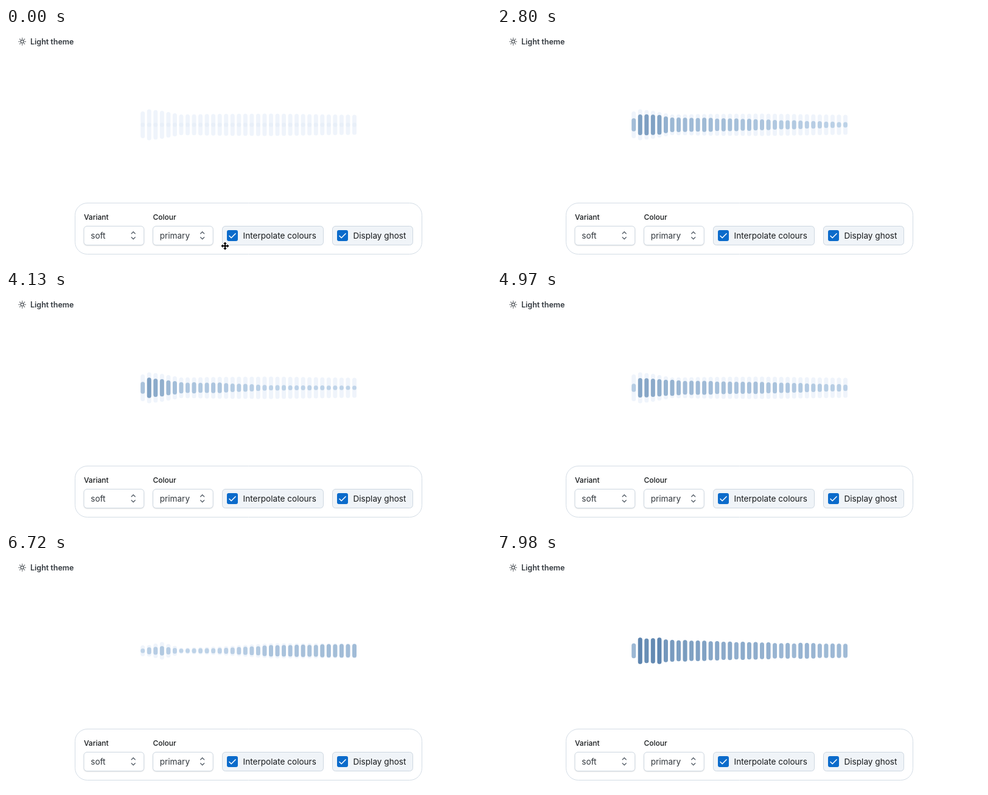
An HTML page with a canvas for the animation above (8000 ms loop, 797x386 px).

```html
<!DOCTYPE html>
<html lang="en">
<head>
<meta charset="utf-8">
<title>Waveform</title>
<style>
  html, body { margin: 0; width: 100%; height: 100%; overflow: hidden; background: #fff; }
  canvas { display: block; width: 797px; height: 386px; }
</style>
</head>
<body>
<canvas id="stage"></canvas>
<script>
const W = 797, H = 386, LOOP = 8000, STEP = 70;
const BARS = 34, LEFT = 224.7, PITCH = 10.54, MID = 159, BAR_W = 7;
const canvas = document.getElementById('stage');
const dpr = window.devicePixelRatio || 1;
canvas.width = W * dpr;
canvas.height = H * dpr;
const ctx = canvas.getContext('2d');

const lerp = (a, b, u) => a + (b - a) * u;
const clamp = x => Math.min(1, Math.max(0, x));
const rgb = c => `rgb(${c.map(Math.round)})`;
const mix = (a, b, u) => rgb(a.map((v, i) => lerp(v, b[i], u)));

// Repeatable noise from -1 to 1.
function noise(i, seed) {
  const x = Math.sin(i * 12.9898 + seed * 78.233) * 43758.5453;
  return (x - Math.floor(x)) * 2 - 1;
}

// A spectrum is a smooth outline through a few bands, closer together at the low end.
const BANDS = [0, 1, 3, 6, 12, 20, 33];
function outline(...heights) {
  return i => {
    let k = 0;
    while (k < BANDS.length - 2 && i > BANDS[k + 1]) k++;
    return lerp(heights[k], heights[k + 1], (i - BANDS[k]) / (BANDS[k + 1] - BANDS[k]));
  };
}

const poses = [
  { time: 0, shape: () => 0 },
  { time: 1540, shape: outline(18, 32, 30, 20, 22, 18, 10) },
  { time: 2800, shape: outline(23, 36, 34, 24, 22, 18, 9) },
  { time: 4130, shape: outline(20, 34, 27, 18, 17, 9, 7) },
  { time: 4970, shape: outline(14, 31, 32, 25, 22, 19, 11) },
  { time: 6720, shape: outline(8, 12, 15, 7, 9, 18, 22) },
  { time: 7980, shape: outline(23, 42, 44, 37, 31, 27, 23) }
];
const ghostHigh = outline(44, 51, 46, 34, 36, 37, 33);
const ghostLow = outline(18, 19, 29, 10, 14, 25, 25);

const GHOST = [239, 244, 251], PALE = [190, 211, 232], DEEP = [92, 132, 174];

function barColour(h) {
  return h < 7 ? mix(GHOST, PALE, 0.15 + 0.85 * h / 7)
               : mix(PALE, DEEP, Math.pow(clamp((h - 7) / 37), 1.4));
}

function barHeight(i, t) {
  let k = 0;
  while (k < poses.length - 2 && t > poses[k + 1].time) k++;
  const a = poses[k], b = poses[k + 1];
  const u = clamp((t - a.time) / (b.time - a.time));
  const level = (pose, seed) => pose.shape(i) * (1 + 0.06 * noise(i, seed));
  const base = lerp(level(a, k), level(b, k + 1), k ? u : Math.sqrt(u));
  const s = t / 1000;
  const pulse = 0.14 * Math.sin(s * 11) + 0.08 * Math.sin(s * 23 + i * 0.3);
  const jitter = 0.09 * Math.sin(s * 17 + i * 2.4);
  return base * (1 + Math.sin(Math.PI * u) * (pulse + jitter));
}

function box(x, y, w, h, r, fill, stroke) {
  ctx.beginPath();
  ctx.roundRect(x, y, w, h, r);
  if (fill) { ctx.fillStyle = fill; ctx.fill(); }
  if (stroke) { ctx.strokeStyle = stroke; ctx.lineWidth = 1; ctx.stroke(); }
}

function line(points, colour, width) {
  ctx.beginPath();
  points.forEach(([x, y]) => ctx.lineTo(x, y));
  ctx.strokeStyle = colour;
  ctx.lineWidth = width;
  ctx.lineCap = ctx.lineJoin = 'round';
  ctx.stroke();
}

function text(str, x, y, size, weight, colour) {
  ctx.font = `${weight} ${size}px Inter, sans-serif`;
  ctx.fillStyle = colour;
  ctx.fillText(str, x, y);
}

function pill(i, h, colour) {
  box(LEFT + i * PITCH - BAR_W / 2, MID - h / 2, BAR_W, h, BAR_W / 2, colour);
}

function drawWave(t) {
  const fall = clamp((t - 5040) / 840);
  for (let i = 0; i < BARS; i++) {
    const level = barHeight(i, t), h = Math.max(7, level);
    const ghost = lerp(ghostHigh(i), ghostLow(i), fall);
    pill(i, Math.max(ghost, h), rgb(GHOST));
    pill(i, h, barColour(level));
  }
}

function drawSun(x, y) {
  ctx.beginPath();
  ctx.arc(x, y, 2.6, 0, 7);
  ctx.strokeStyle = '#32383e';
  ctx.lineWidth = 1.1;
  ctx.stroke();
  for (let k = 0; k < 8; k++) {
    const c = Math.cos(k * Math.PI / 4), s = Math.sin(k * Math.PI / 4);
    line([[x + c * 4.7, y + s * 4.7], [x + c * 5.7, y + s * 5.7]], '#32383e', 1.1);
  }
}

function drawSelect(x, label, value) {
  text(label, x, 315, 12, 500, '#171a1c');
  ctx.save();
  ctx.shadowColor = 'rgba(21,21,21,.16)';
  ctx.shadowBlur = 2 * dpr;
  ctx.shadowOffsetY = dpr;
  box(x, 325.5, 98.7, 31, 5, '#fff');
  ctx.restore();
  box(x, 325.5, 98.7, 31, 5, null, '#cdd7e1');
  text(value, x + 11.2, 346, 13.6, 400, '#32383e');
  const c = x + 81.2;
  line([[c - 3, 337.7], [c, 334.7], [c + 3, 337.7]], '#555e68', 1.3);
  line([[c - 3, 343.8], [c, 346.8], [c + 3, 343.8]], '#555e68', 1.3);
}

function drawCheck(x, w, label) {
  box(x, 325.5, w, 31, 5, '#f0f4f8', '#cdd7e1');
  box(x + 7.5, 332, 18, 18, 3, '#0b6bcb');
  line([[x + 11.5, 341.5], [x + 14.7, 344.7], [x + 21.6, 337.8]], '#fff', 1.5);
  text(label, x + 34, 346, 13.6, 400, '#171a1c');
}

function drawCursor(x, y) {
  const shape = (colour, grow) => {
    for (let k = 0; k < 4; k++) {
      ctx.save();
      ctx.translate(x, y);
      ctx.rotate(k * Math.PI / 2);
      line([[0, 0], [0, -4]], colour, 2 + grow);
      ctx.beginPath();
      ctx.moveTo(0, -6.5);
      ctx.lineTo(3, -3.5);
      ctx.lineTo(-3, -3.5);
      ctx.closePath();
      ctx.fillStyle = colour;
      ctx.fill();
      if (grow) { ctx.lineWidth = grow; ctx.stroke(); }
      ctx.restore();
    }
  };
  shape('#fff', 2);
  shape('#000', 0);
}

function draw(t) {
  ctx.setTransform(dpr, 0, 0, dpr, 0, 0);
  ctx.fillStyle = '#fff';
  ctx.fillRect(0, 0, W, H);
  drawSun(26.7, 22.2);
  text('Light theme', 40, 27, 12.5, 600, '#32383e');
  drawWave(t);
  box(113.5, 287.5, 570, 84, 20, '#fff', '#d3dce5');
  drawSelect(128, 'Variant', 'soft');
  drawSelect(241.5, 'Colour', 'primary');
  drawCheck(355.5, 166, 'Interpolate colours');
  drawCheck(536.5, 132, 'Display ghost');
  if (t < 420) drawCursor(360, 358);
}

const start = performance.now();
function tick() {
  const t = (performance.now() - start) % LOOP;
  draw(Math.floor(t / STEP) * STEP);
  requestAnimationFrame(tick);
}
tick();
</script>
</body>
</html>
```
